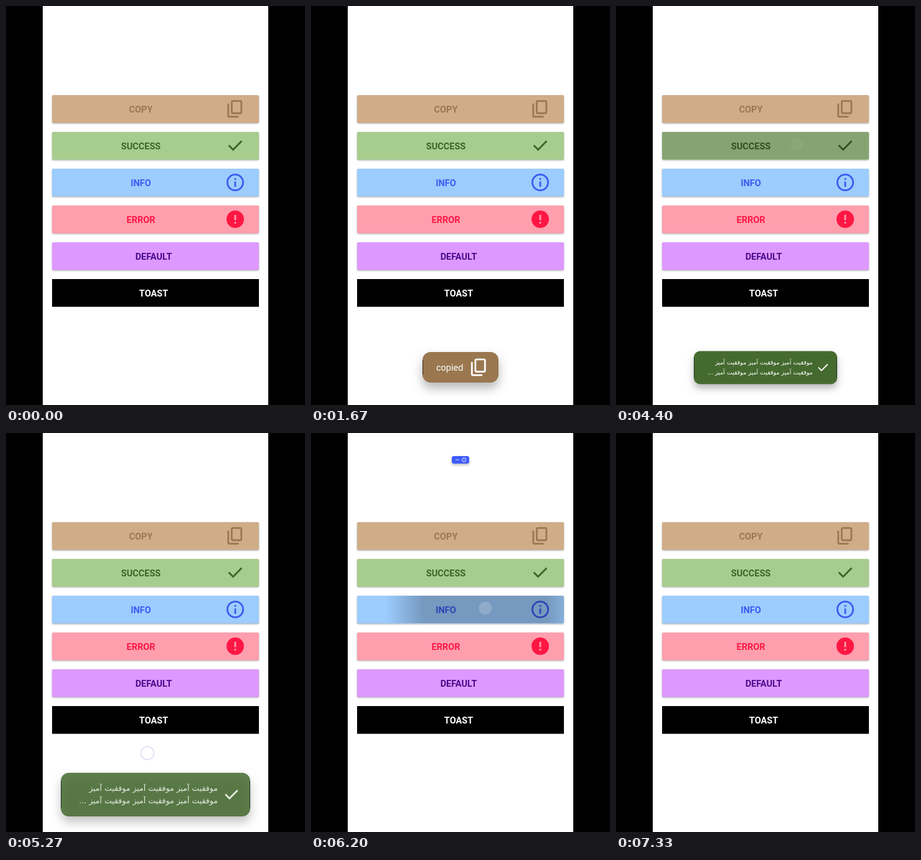
Write an HTML page with a canvas that moves like this. It is 480 by 640 pixels and loops after 8000 ms.

```html
<!DOCTYPE html>
<html lang="en">
<head>
<meta charset="utf-8">
<title>Toast buttons</title>
<style>
html, body { margin: 0; width: 100%; height: 100%; overflow: hidden; background: #000; }
canvas { display: block; }
</style>
</head>
<body>
<canvas id="stage" width="480" height="640"></canvas>
<script>
const ctx = document.getElementById('stage').getContext('2d');
const LOOP = 8000;
const LATIN = 'Roboto, sans-serif';
const ARABIC = '"DejaVu Sans", sans-serif';

// Icons on a 24-unit grid
const disc = 'M12 2a10 10 0 1 0 0 20a10 10 0 0 0 0-20z';
const icons = {
  copy: new Path2D('M9 18q-.8 0-1.4-.6T7 16V4q0-.8.6-1.4T9 2h9q.8 0 1.4.6T20 4v12q0 .8-.6 1.4T18 18zM9 16h9V4H9zM5 22q-.8 0-1.4-.6T3 20V6h2v14h11v2z'),
  check: new Path2D('M9.55 18l-5.7-5.7 1.42-1.42 4.28 4.27 9.17-9.17 1.43 1.42z'),
  info: new Path2D(disc + 'M12 4a8 8 0 1 0 0 16a8 8 0 0 0 0-16zM11 11h2v6h-2zM11 7h2v2h-2z'),
  error: new Path2D(disc + 'M11 7h2v6h-2zM11 15h2v2h-2z')
};

const buttons = [
  { label: 'COPY', fill: '#d0ad88', ink: '#9c7850', icon: 'copy' },
  { label: 'SUCCESS', fill: '#a7cd8e', ink: '#3a6526', icon: 'check' },
  { label: 'INFO', fill: '#9dccff', ink: '#3d5af1', icon: 'info' },
  { label: 'ERROR', fill: '#ff9fae', ink: '#ff1744', icon: 'error' },
  { label: 'DEFAULT', fill: '#dd99ff', ink: '#4b0a8c' },
  { label: 'TOAST', fill: '#000', ink: '#fff', flat: true }
];

const line = 'موفقیت آمیز موفقیت آمیز موفقیت آمیز';

// Toast geometry is relative to its centre
const toasts = [
  { start: 800, end: 3470, y: 579.5, w: 122, h: 49, fill: '#9a774f', icon: 'copy', iconX: 29.5,
    text: [['copied', -39, 5]] },
  { start: 4000, end: 5390, fade: 140, y: 580, w: 304, h: 70, fill: '#456a30', icon: 'check', iconX: 122,
    rtl: true, text: [[line, 100, -6], [line + ' ...', 100, 14]] },
  { start: 6070, end: 7330, fade: 130, y: 43, w: 112, h: 49, fill: '#3d5afe', icon: 'info', iconX: 23.5,
    text: [['info', -33, 5]] }
];

const taps = [
  { start: 800, end: 1130, x: 285, y: 164, row: 0 },
  { start: 4000, end: 4430, x: 290, y: 222, row: 1 },
  { start: 5130, end: 5400, x: 227, y: 513.5 },
  { start: 6070, end: 6400, x: 280, y: 281, row: 2 },
  { start: 7000, end: 7330, x: 343, y: 67 }
];

const clamp = v => Math.max(0, Math.min(1, v));
const rowTop = i => 143 + 59 * i;

function shadow(color, blur = 0, dy = 0) {
  ctx.shadowColor = color;
  ctx.shadowBlur = blur;
  ctx.shadowOffsetY = dy;
}

function box(x, y, w, h, r) {
  ctx.beginPath();
  ctx.roundRect(x, y, w, h, r);
}

function drawIcon(name, x, y, scale) {
  ctx.save();
  ctx.translate(x, y);
  ctx.scale(scale, scale);
  ctx.translate(-12, -12);
  ctx.fill(icons[name], 'evenodd');
  ctx.restore();
}

function drawRipple(tap, t) {
  const age = t - tap.start;
  if (age < 0 || age > 800) return;
  const alpha = 0.25 * (1 - clamp((age - 300) / 500));
  const radius = 20 + age * 1.08;
  const g = ctx.createRadialGradient(tap.x, tap.y, 0, tap.x, tap.y, radius);
  g.addColorStop(0, `rgba(0,0,0,${alpha})`);
  g.addColorStop(0.62, `rgba(0,0,0,${alpha})`);
  g.addColorStop(1, 'rgba(0,0,0,0)');
  ctx.fillStyle = g;
  box(74, rowTop(tap.row), 332, 44, 2);
  ctx.fill();
}

function drawButton(b, i, t) {
  const y = rowTop(i);
  ctx.fillStyle = b.fill;
  if (!b.flat) shadow('rgba(0,0,0,.35)', 2.5, 1);
  box(74, y, 332, 44.5, b.flat ? 0 : 2);
  ctx.fill();
  shadow('transparent');
  ctx.fillStyle = b.ink;
  ctx.font = '700 14.5px ' + LATIN;
  ctx.textAlign = 'center';
  ctx.direction = 'ltr';
  ctx.fillText(b.label, b.icon ? 216.5 : 237, y + 28);
  if (b.icon) drawIcon(b.icon, 368, y + 22, 1.4);
  taps.filter(tap => tap.row === i).forEach(tap => drawRipple(tap, t));
}

function drawToast(o, t) {
  if (t <= o.start || t >= o.end) return;
  const s = clamp((t - o.start) / 530);
  const { w, h } = o;
  ctx.save();
  ctx.globalAlpha = o.fade ? clamp((o.end - t) / o.fade) : 1;
  ctx.translate(240, o.y);
  ctx.scale(s, s);
  shadow('rgba(0,0,0,.28)', 16 * s, 9 * s);
  ctx.fillStyle = o.fill;
  box(-w / 2, -h / 2, w, h, 13);
  ctx.fill();
  shadow('transparent');

  // Dark hairline on the straight sides
  ctx.fillStyle = 'rgba(0,0,0,.7)';
  ctx.fillRect(-w / 2, 13 - h / 2, 1, h - 26);
  if (o.rtl) ctx.fillRect(w / 2 - 1, 13 - h / 2, 1, h - 26);

  ctx.fillStyle = '#fff';
  ctx.font = o.rtl ? '12.5px ' + ARABIC : '14.5px ' + LATIN;
  ctx.direction = o.rtl ? 'rtl' : 'ltr';
  ctx.textAlign = o.rtl ? 'right' : 'left';
  o.text.forEach(([str, x, y]) => ctx.fillText(str, x, y));
  drawIcon(o.icon, o.iconX, 0, o.rtl ? 1.32 : 1.4);
  ctx.restore();
}

function drawTap(tap, t) {
  if (t < tap.start || t >= tap.end) return;
  ctx.save();
  ctx.globalAlpha = clamp((tap.end - t) / 130);
  ctx.beginPath();
  ctx.arc(tap.x, tap.y, 10.5, 0, Math.PI * 2);
  ctx.fillStyle = 'rgba(255,255,255,.18)';
  ctx.fill();
  if (tap.row === undefined) {
    ctx.strokeStyle = 'rgba(140,120,210,.25)';
    ctx.lineWidth = 1.6;
    ctx.stroke();
  }
  ctx.restore();
}

function draw(t) {
  ctx.fillStyle = '#000';
  ctx.fillRect(0, 0, 480, 640);
  ctx.fillStyle = '#fff';
  ctx.fillRect(59, 0, 362, 640);
  buttons.forEach((b, i) => drawButton(b, i, t));
  toasts.forEach(o => drawToast(o, t));
  taps.forEach(tap => drawTap(tap, t));
}

const origin = performance.now();
function tick() {
  draw((performance.now() - origin) % LOOP);
  requestAnimationFrame(tick);
}
tick();
</script>
</body>
</html>
```
